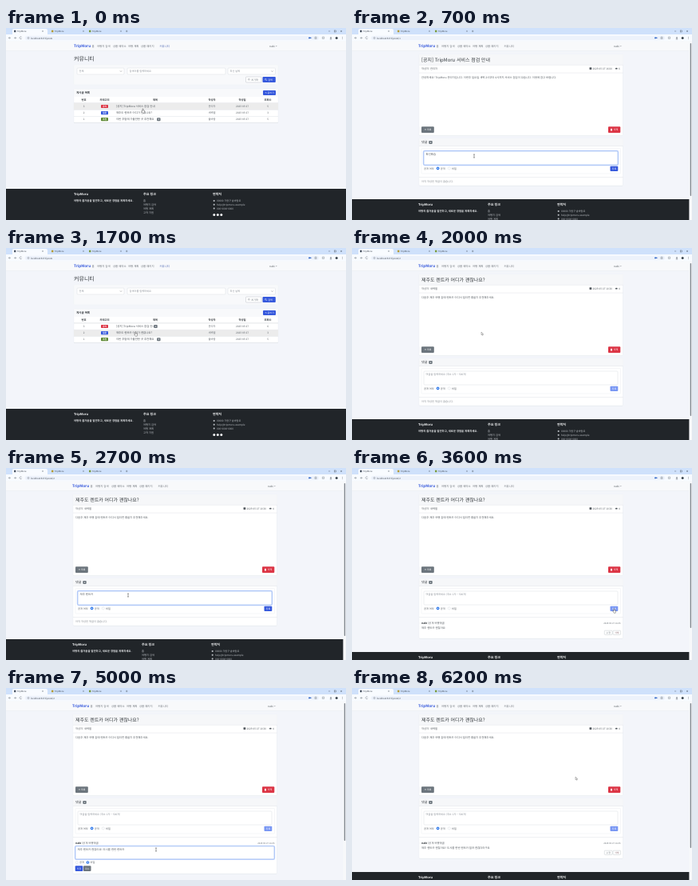
Recreate the animation shown at these times as an HTML page. Size 426 by 240 pixels, loop 6.3 s.

```html
<!DOCTYPE html>
<html lang="ko">
<head>
<meta charset="utf-8">
<title>TripMoru</title>
<style>
html, body { margin: 0; width: 100%; height: 100%; overflow: hidden; background: #f3f5fa; }
svg { display: block; width: 100vw; height: 100vh; }
text { font-family: "Noto Sans CJK KR", "Noto Sans CJK", "Noto Sans", sans-serif; text-rendering: geometricPrecision; white-space: pre; }
</style>
</head>
<body>
<svg id="stage" viewBox="0 0 426 240"></svg>
<script>
const LOOP = 6300, STEP = 100;
const BRAND = 'TripMoru', USER = 'nabi';
const BLUE = '#3558dc', RED = '#dc3545', GRAY = '#6c757d', INK = '#33383d', DARK = '#212529';
const stage = document.getElementById('stage');

// y is the vertical centre of the text
function text(x, y, s, size = 3.4, fill = '#555b61', { bold, anchor = 'start' } = {}) {
  return `<text x="${x}" y="${y + size * 0.36}" font-size="${size}" fill="${fill}" text-anchor="${anchor}" font-weight="${bold ? 700 : 400}">${s}</text>`;
}
function rect(x, y, w, h, fill, r = 0, stroke = 'none', sw = 0.4) {
  return `<rect x="${x}" y="${y}" width="${w}" height="${h}" rx="${r}" fill="${fill}" stroke="${stroke}" stroke-width="${sw}"/>`;
}
function path(d, stroke, sw = 0.5, fill = 'none') {
  return `<path d="${d}" stroke="${stroke}" stroke-width="${sw}" fill="${fill}"/>`;
}
function dot(x, y, r, fill, stroke = 'none', sw = 0.4) {
  return `<circle cx="${x}" cy="${y}" r="${r}" fill="${fill}" stroke="${stroke}" stroke-width="${sw}"/>`;
}
const mid = (x, y, s, size, fill, bold) => text(x, y, s, size, fill, { bold, anchor: 'middle' });
const line = (x, y, w, c = '#dee2e6') => rect(x, y, w, 0.5, c);
const group = (x, y, s) => `<g transform="translate(${x} ${y})">${s}</g>`;

function button(x, y, w, h, label, fill, ink = '#fff', stroke = 'none') {
  return rect(x, y, w, h, fill, 0.9, stroke) + mid(x + w / 2, y + h / 2, label, 2.9, ink);
}
function field(x, y, w, h, label, focus) {
  const glow = focus ? rect(x - 0.5, y - 0.5, w + 1, h + 1, 'none', 1.4, '#c4d5fb', 1.3) : '';
  const ink = focus ? '#555b61' : '#868c94';
  return glow + rect(x, y, w, h, '#fff', 1, focus ? '#7fa6ee' : '#d9dde2', 0.5) +
    text(x + 2.6, y + (h > 10 ? 4 : h / 2), label, focus ? 3.4 : 3.2, ink);
}
function select(x, y, w, label) {
  const e = x + w - 4;
  return field(x, y, w, 8, label) + path(`M${e - 1} ${y + 3.5}l1 1 1-1`, '#666');
}
function radio(x, y, label, on) {
  return dot(x, y, 1.6, on ? '#1669e8' : '#fff', on ? '#1669e8' : '#d0d4da') +
    (on ? dot(x, y, 0.7, '#fff') : '') + text(x + 3.2, y, label, 3.2);
}
function card(x, y, w, h) {
  return rect(x, y + 0.5, w, h, '#e6e9ee', 1) + rect(x, y, w, h, '#fff', 1, '#e4e7ec', 0.3);
}

function browser(url) {
  let s = rect(0, 0, 426, 9, '#cfe1fb') + rect(8, 1, 44, 9, '#f8fbff', 2) + rect(0, 8, 426, 8.5, '#f8fbff');
  [[10, BRAND, '#4b5563'], [57, BRAND, '#b49a32'], [104, BRAND, '#7b9b3d']].forEach(([x, label, c], i) => {
    s += rect(x, 2.8, 2.4, 2.4, c, 0.3) + text(x + 4, 4.1, label, 2.7, '#3d4650');
    const e = x + (i ? 40 : 36);
    s += path(`M${e - 0.8} 3.2l1.6 1.6m0-1.6l-1.6 1.6`, '#56606a', 0.4);
  });
  s += path('M150 4h2.4m-1.2-1.2v2.4M404 4h2.2M419 3l2 2m0-2l-2 2', '#414a55', 0.4);
  s += rect(411.4, 3, 2, 2, 'none', 0, '#414a55', 0.4);
  s += path('M6 12.4H3.4m1.2-1.2l-1.2 1.2 1.2 1.2M10 12.4h2.6m-1.2-1.2l1.2 1.2-1.2 1.2M19.6 11.4a1.4 1.4 0 1 0 .2 1.5', '#56606a', 0.45);
  s += rect(24, 9.7, 368, 5.6, '#edf2fb', 2.8) + dot(28, 12.5, 1, 'none', '#5c6570') +
    text(31, 12.5, url, 2.8, '#424b55');
  s += rect(379.5, 11.8, 3, 1.2, '#2f65c7', 0.5) + dot(380, 12.4, 0.9, '#2f65c7') +
    path('M387 11.3h2v2.4l-1-.8-1 .8zM396.4 11.2h2.2v2.2h-2.2z', '#56606a', 0.4);
  s += path('M407 10.8v2.3m-1-1l1 1 1-1M405.8 14h2.4', '#414a55', 0.5) + dot(414.2, 12.5, 1.5, '#3c4650');
  [11.2, 12.5, 13.8].forEach(y => s += dot(421.5, y, 0.35, '#414a55'));
  return s;
}

function navbar(dx, active) {
  let s = rect(0, 16.5, 426, 12, '#f8f9fb') + line(0, 28.4, 426, '#e7eaef');
  s += text(85 + dx, 22.7, BRAND, 4.7, BLUE, { bold: true });
  [[107.5, '홈'], [114, '여행지 검색'], [134, '상품 예약소'], [153, '여행 계획'], [169, '상품 패키지'], [192.5, '커뮤니티']]
    .forEach(([x, label], i) => s += text(x + dx, 22.8, label, 3.4, active && i == 5 ? '#536bb5' : '#6a7077'));
  return s + text(330 + dx, 22.8, USER, 3.2, '#555b61') + path(`M${338 + dx} 22.4l.8 .9.8-.9z`, 'none', 0, '#555b61');
}

function footer(dx, y) {
  if (y >= 240) return '';
  const w = '#f4f5f6', c = '#b9bdc2';
  let s = rect(0, 0, 426, 60, DARK);
  s += text(85, 7, BRAND, 4, w, { bold: true }) + text(85, 15, '여행의 즐거움을 발견하고, 새로운 경험을 계획하세요.', 3.35, '#e4e6e8', { bold: true });
  s += text(172, 7, '주요 링크', 4, w, { bold: true }) + text(259, 7, '연락처', 4, w, { bold: true });
  ['홈', '여행지 검색', '여행 계획', '고객 지원'].forEach((l, i) => s += text(172, 15 + i * 4.8, l, 3.3, c));
  ['00000 가람구 솔바람로', 'help@tripmoru.example', '000-0000-0000'].forEach((l, i) => {
    s += rect(259.7, 14 + i * 4.8, 2, 2, c, 0.8) + text(264, 15 + i * 4.8, l, 3.1, c);
  });
  [260.8, 265.3, 269.8].forEach(x => s += dot(x, 32.6, 1.5, w));
  return group(dx, y, s);
}

function badge(x, y, s) {
  return rect(x - 2.2, y - 2, 4.4, 4, GRAY, 0.8) + mid(x, y, s, 2.6, '#fff', true);
}

function listPage(hover, answered) {
  let s = navbar(0, true) + text(85, 38.7, '커뮤니티', 7, INK);
  s += rect(85, 46, 256, 25, '#f8f9fb', 1, '#e9ecf1', 0.3);
  s += select(89, 50, 59, '전체') + field(152, 50, 123, 8, '검색어를 입력하세요') + select(278, 50, 59.5, '최신 날짜');
  s += button(300.5, 61, 19.5, 7, '', '#fff', GRAY, '#aeb4ba') + dot(304.4, 64.3, 0.9, 'none', GRAY) + text(307.2, 64.5, '초기화', 3.1, GRAY);
  s += button(321.5, 61, 16.3, 7, '', BLUE) + dot(325.3, 64.2, 0.9, 'none', '#fff') + path('M326 65l.8.8', '#fff') + text(328.2, 64.5, '검색', 3.1, '#fff');
  s += card(85, 76, 256, 42.3) + rect(85, 76, 256, 10, '#f8f9fb', 1);
  s += text(88, 81, '게시글 목록', 3.5, INK, { bold: true }) + button(322, 78, 16, 6, '✎ 글쓰기', BLUE);
  const cols = [97.5, 123.5, 187, 258, 296, 328];
  ['번호', '카테고리', '제목', '작성자', '작성일', '조회수'].forEach((l, i) => s += mid(cols[i], 90, l, 3.3, INK, true));
  s += line(85, 93.7, 256, '#c5cad0');
  const rows = [
    ['3', '공지', RED, `[공지] ${BRAND} 서비스 점검 안내`, '관리자', answered ? '6' : '5'],
    ['2', '질문', BLUE, '제주도 렌트카 어디가 괜찮나요?', '새벽별', '3'],
    ['1', '추천', '#5f8a36', '이번 주말에 가볼만한 곳 추천해요', '들바람', '5']
  ];
  rows.forEach(([no, kind, color, title, author, views], i) => {
    const y = 98 + i * 8.1;
    if (i == hover) s += rect(85, y - 3.9, 256, 8, '#ececec');
    s += mid(97.5, y, no, 3.1, '#555b61') + rect(119, y - 2.1, 9, 4.2, color, 0.8) + mid(123.5, y, kind, 2.8, '#fff', true);
    s += text(138, y, title, 3.4, '#4b5157') + mid(258, y, author, 3.3, '#666c72');
    s += mid(296, y, '2025-05-27', 3.1, '#555b61') + mid(328, y, views, 3.1, '#555b61') + line(85, y + 3.9, 256);
  });
  if (answered) s += badge(187.5, 98, '1');
  return s + badge(191.3, 114.2, '2') + footer(0, 201);
}

function detailPage({ post, draft, focus, comment, edit, press }) {
  const notice = post == 1;
  const cardEnd = edit != null ? 232 : comment ? 213 : 197;
  let s = navbar(-2, false) + card(84, 33, 255.5, 101.5) + rect(84, 33, 255.5, 13, '#f6f7f9', 1);
  s += text(87, 40, notice ? `[공지] ${BRAND} 서비스 점검 안내` : '제주도 렌트카 어디가 괜찮나요?', 6, INK);
  s += line(84, 45.9, 255.5) + text(87, 50.6, `작성자: ${notice ? '관리자' : '새벽별'}`, 3.3);
  s += rect(297.5, 49.2, 2.8, 2.8, '#555b61', 0.4) + text(301.5, 50.7, `2025-05-27 1${notice ? '6:00' : '0:30'}`, 3.1);
  s += `<ellipse cx="331.3" cy="50.7" rx="1.4" ry=".9" fill="#555b61"/>` + text(334, 50.7, notice ? '6' : '4', 3.1) + line(84, 55.8, 255.5);
  s += text(87, 61.8, notice
    ? `안녕하세요! ${BRAND} 관리자입니다. 이번주 일요일 새벽 2시부터 4시까지 서비스 점검이 있습니다. 이용에 참고 바랍니다.`
    : '다음주 제주 여행 갈때 렌트카 어디서 빌리면 좋을지 추천해주세요.', 3.35);
  s += button(87, 123.3, 15.8, 7.7, '≡ 목록', GRAY) + button(321, 123.3, 15.3, 7.7, '', RED) +
    rect(324, 125.8, 2, 2.8, '#fff', 0.4) + text(327.5, 127.2, '삭제', 3.1, '#fff');

  s += card(84, 138, 255.5, cardEnd - 138) + rect(84, 138, 255.5, 9.6, '#f6f7f9', 1) + line(84, 147.5, 255.5);
  s += text(87, 142.8, '댓글', 4, INK) + badge(98.5, 142.9, comment ? '1' : '0');
  s += rect(87, 150.5, 249.5, 31.5, '#fff', 1, '#e6e9ed', 0.4);
  s += field(90, 154, 243, 17, draft || '댓글을 입력하세요 (최소 1자 ~ 500자)', focus);
  s += text(90, 175.5, '공개 여부', 3.2) + radio(107.6, 175.4, '공개', true) + radio(121.8, 175.4, '비밀', false);
  s += button(323.5, 172.7, 9.8, 6.2, '등록', draft && !press ? BLUE : '#7896f3');
  s += line(84, 186.5, 255.5);
  if (!comment) s += text(87, 192, '아직 작성된 댓글이 없습니다.', 3.3, '#868c92');
  else {
    s += text(87, 194, USER, 3.4, INK, { bold: true }) + text(95, 194, '(공개 여행댓글)', 3.3);
    s += text(336.5, 194, '2025-05-27 16:05', 2.7, '#6a7077', { anchor: 'end' });
    if (edit != null) {
      s += field(87, 197.8, 249, 16, edit, true);
      s += radio(88.8, 218, '공개', false) + radio(102.4, 218, '비밀', true);
      s += button(86.7, 222.3, 9.6, 6.6, '저장', BLUE) + button(97, 222.3, 9.5, 6.6, '취소', GRAY);
    } else {
      s += text(87, 199.7, comment, 3.4);
      s += button(316.3, 203.2, 9.8, 5.2, '수정', '#fff', GRAY, '#b4bac0') + button(327, 203.2, 9.6, 5.2, '삭제', '#fff', '#8b6a70', '#b4bac0');
    }
  }
  s += footer(-2, edit != null ? 250 : comment ? 230 : 214);
  s += rect(422.4, 16.5, 3.6, 224, '#f7f8fa');
  return s + rect(423.7, 19, 1.4, (edit != null ? 172 : comment ? 181 : 191), '#7f868e', 0.7);
}

const EASE = u => u * u * (3 - 2 * u);
const MOUSE = [
  [0, 171, 101], [100, 171, 101], [400, 153, 160], [700, 153, 160], [1000, 328, 176],
  [1300, 95, 127], [1400, 95, 127], [1700, 162, 105], [2000, 162, 105], [2200, 153, 159],
  [3200, 153, 159], [3500, 328, 176], [3600, 328, 176], [3900, 321, 206], [4000, 321, 206],
  [4200, 188, 202], [5500, 188, 202], [5700, 91, 225], [6200, 280, 111]
];
function mouse(t) {
  const i = Math.max(1, MOUSE.findIndex(k => k[0] >= t));
  const [a, ax, ay] = MOUSE[i - 1], [b, bx, by] = MOUSE[i];
  const u = EASE((t - a) / (b - a));
  return [ax + (bx - ax) * u, ay + (by - ay) * u];
}
function pointer(t, focus, hand) {
  const [x, y] = mouse(t);
  if (focus && x < 300 && y > 154) return group(x, y, path('M-1-2h2M0-2v4M-1 2h2', '#333', 0.45));
  return group(x, y, hand
    ? path('M0 0v3l-1-.6v1.2l1.2 1.6h2l.5-2.8-1.7-.4V0z', '#333', 0.4, '#fff')
    : path('M0 0v3.6l.9-.8.7 1.5.6-.3-.7-1.4h1.1z', '#444', 0.35, '#fff'));
}

function typed(s, t, from, to) {
  const u = Math.min(1, Math.max(0, (t - from) / (to - from)));
  return s.slice(0, Math.round(s.length * u));
}

const NOTE = '확인했습니다', REPLY = '제주 렌트카 괜찮아요', MORE = '! 도시를 한번 렌트카 빌려 괜찮더라구요';

function scene(t) {
  if (t < 100) return ['list', listPage(0, false)];
  if (t < 1000) return ['detail', { post: 1, focus: t >= 400 && t < 900, draft: typed(NOTE, t, 400, 900), press: t >= 900 }];
  if (t < 1400) return ['detail', { post: 1, comment: NOTE }];
  if (t < 2000) return ['list', listPage(t < 1500 ? -1 : t < 1600 ? 2 : 1, true)];
  if (t < 3600) return ['detail', { post: 2, focus: t >= 2200 && t < 3500, draft: typed(REPLY, t, 2200, 3100), press: t >= 3500 }];
  if (t < 4100) return ['detail', { post: 2, comment: REPLY }];
  if (t < 5800) return ['detail', { post: 2, comment: REPLY, edit: REPLY + typed(MORE, t, 4400, 5500) }];
  return ['detail', { post: 2, comment: REPLY + MORE }];
}

function render(t) {
  const [kind, data] = scene(t);
  const list = kind == 'list';
  const url = 'localhost:5173/posts' + (list ? '' : '/' + data.post);
  const focus = !list && (data.focus || data.edit != null);
  const hand = list || [1000, 1300, 3500, 3600, 3900, 4000, 5700].includes(t);
  stage.innerHTML = rect(0, 0, 426, 240, '#f3f5fa') + (list ? data : detailPage(data)) + browser(url) + pointer(t, focus, hand);
}

const start = performance.now();
let last = -1;
function tick() {
  const t = Math.floor(((performance.now() - start) % LOOP) / STEP) * STEP;
  if (t !== last) render(last = t);
  requestAnimationFrame(tick);
}
tick();
</script>
</body>
</html>
```
